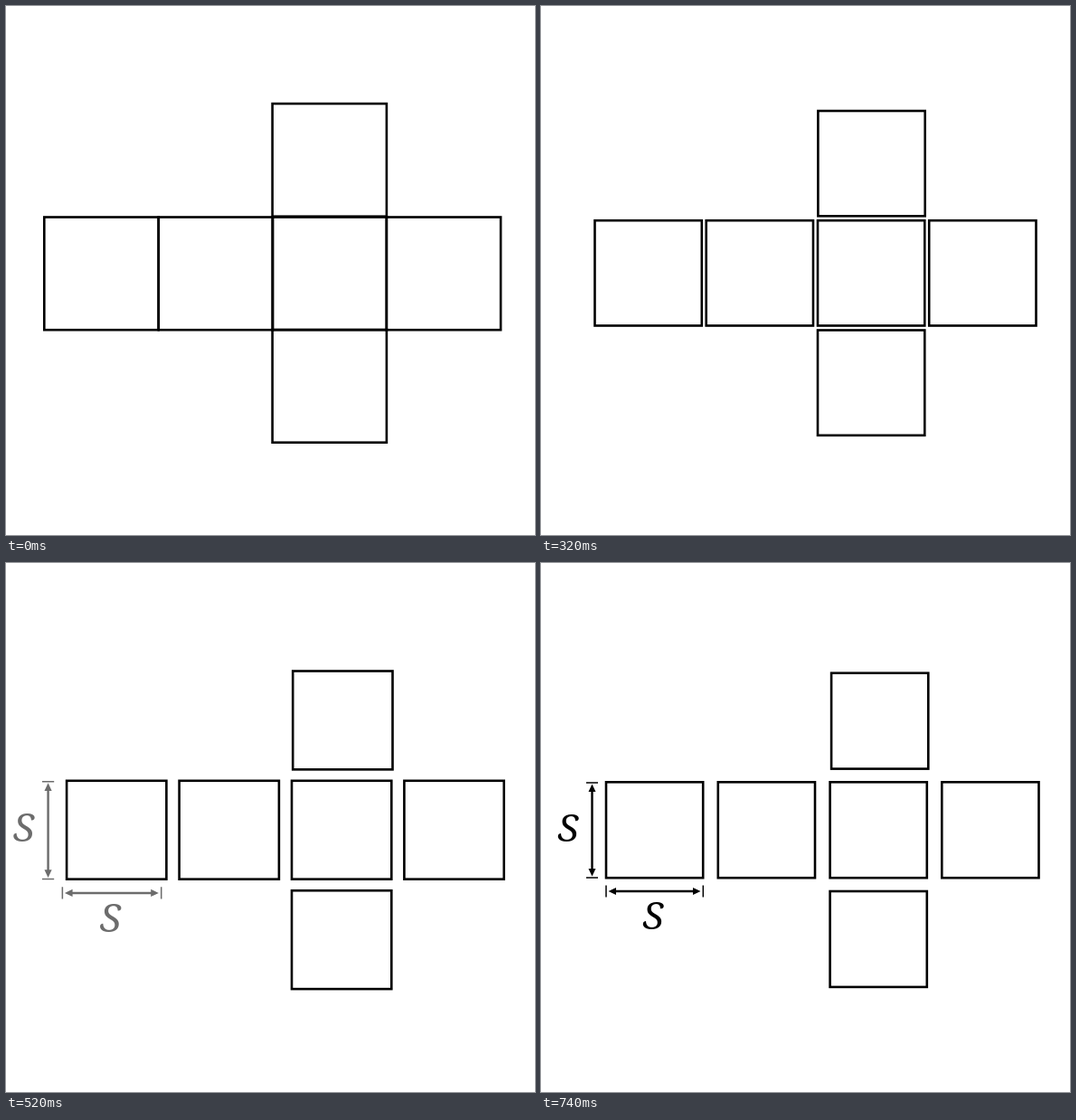
An HTML page that plays this animation: 585x585 px, repeating every 3000 ms.

```html
<!DOCTYPE html>
<html lang="en">
<head>
<meta charset="utf-8">
<title>Cube net</title>
<style>
  @property --w { syntax: "<length>"; inherits: true; initial-value: 0px }
  @property --h { syntax: "<length>"; inherits: true; initial-value: 0px }
  @property --x1 { syntax: "<length>"; inherits: true; initial-value: 0px }
  @property --x2 { syntax: "<length>"; inherits: true; initial-value: 0px }
  @property --x3 { syntax: "<length>"; inherits: true; initial-value: 0px }
  @property --x4 { syntax: "<length>"; inherits: true; initial-value: 0px }
  @property --lid { syntax: "<length>"; inherits: true; initial-value: 0px }
  @property --y1 { syntax: "<length>"; inherits: true; initial-value: 0px }
  @property --y2 { syntax: "<length>"; inherits: true; initial-value: 0px }
  @property --y3 { syntax: "<length>"; inherits: true; initial-value: 0px }

  html, body { margin: 0; width: 100%; height: 100%; overflow: hidden; background: #fff }
  svg { display: block; width: 100%; height: 100% }

  .net { fill: none; stroke: #000; stroke-width: 2.6; animation: part 3s infinite }
  .net rect { x: var(--x3); y: var(--y2); width: var(--w); height: var(--h) }
  .net .a { x: var(--x1) }
  .net .b { x: var(--x2) }
  .net .d { x: var(--x4) }
  .net .top { x: var(--lid); y: var(--y1) }
  .net .bottom { y: var(--y3) }

  .labels { transform-origin: 0 0; animation: slide 3s infinite }
  .labels text { font: italic 500 42px "Noto Serif", "Liberation Serif", serif; text-anchor: middle }
  .shaft { stroke: #000; stroke-width: 2.4 }
  .tick { stroke: #000; stroke-width: 1.5 }

  /* The squares shrink apart in 20 ms steps. */
  @keyframes part {
    0% {
      --w: 126.3px; --h: 124.7px; --x1: 42.3px; --x2: 168.8px; --x3: 294.6px; --x4: 420.8px;
      --lid: 294.6px; --y1: 108px; --y2: 233.5px; --y3: 358px;
      animation-timing-function: steps(1);
    }
    7.333% {
      --w: 124.8px; --h: 123.2px; --x1: 47.3px; --x2: 172.4px; --x3: 297px; --x4: 421.6px;
      --lid: 297px; --y1: 110.5px; --y2: 234px; --y3: 357.2px;
      animation-timing-function: steps(5);
    }
    10.666% {
      --w: 118.3px; --h: 116.3px; --x1: 59.5px; --x2: 182.7px; --x3: 306px; --x4: 429.2px;
      --lid: 306.4px; --y1: 116px; --y2: 237.2px; --y3: 358.5px;
      animation-timing-function: steps(4);
    }
    13.333% {
      --w: 114px; --h: 112.6px; --x1: 64.5px; --x2: 187.7px; --x3: 311.2px; --x4: 434.5px;
      --lid: 311.9px; --y1: 118px; --y2: 239px; --y3: 359.7px;
      animation-timing-function: steps(3);
    }
    15.333% {
      --w: 112px; --h: 110.6px; --x1: 65.5px; --x2: 189.6px; --x3: 314px; --x4: 438.3px;
      --lid: 315px; --y1: 118.5px; --y2: 240.1px; --y3: 361.5px;
      animation-timing-function: steps(6);
    }
    19.333% {
      --w: 108.6px; --h: 107.1px; --x1: 68.7px; --x2: 193.6px; --x3: 318px; --x4: 442.5px;
      --lid: 319.4px; --y1: 120.5px; --y2: 241.5px; --y3: 363px;
      animation-timing-function: steps(8);
    }
    24.666%, 100% {
      --w: 107.2px; --h: 105.9px; --x1: 72px; --x2: 195.8px; --x3: 319.6px; --x4: 443.3px;
      --lid: 321.1px; --y1: 121.7px; --y2: 242.3px; --y3: 363px;
    }
  }

  /* The dimension marks fade in from the left. */
  @keyframes slide {
    0% {
      opacity: 0; transform: translate(-27px, -17.7px) scale(1.048, 1.06);
      animation-timing-function: steps(1);
    }
    13.333% {
      opacity: 0; transform: translate(-27px, -17.7px) scale(1.048, 1.06);
      animation-timing-function: steps(3);
    }
    15.333% {
      opacity: .27; transform: translate(-17.6px, -12.4px) scale(1.033, 1.043);
      animation-timing-function: steps(6);
    }
    19.333% {
      opacity: .89; transform: translate(-4.4px, -2.8px) scale(1.005, 1.0095);
      animation-timing-function: steps(8);
    }
    24.666%, 100% { opacity: 1; transform: translate(0px, 0px) scale(1, 1) }
  }
</style>
</head>
<body>
<svg viewBox="0 0 585 585">
  <g class="net">
    <rect class="a"/>
    <rect class="b"/>
    <rect class="c"/>
    <rect class="d"/>
    <rect class="top"/>
    <rect class="bottom"/>
  </g>
  <g class="labels">
    <path class="tick" d="M50 243H63M50 348H63M72 356.5V369.5M179.3 356.5V369.5"/>
    <path class="shaft" d="M56.5 250V341M80 363H171"/>
    <path d="M56.5 244.5l4 8.5h-8zM56.5 346.5l4-8.5h-8zM74.5 363l8.5-4v8zM176.5 363l-8.5-4v8z"/>
    <text x="30" y="308">S</text>
    <text x="124" y="404.5">S</text>
  </g>
</svg>
</body>
</html>
```
